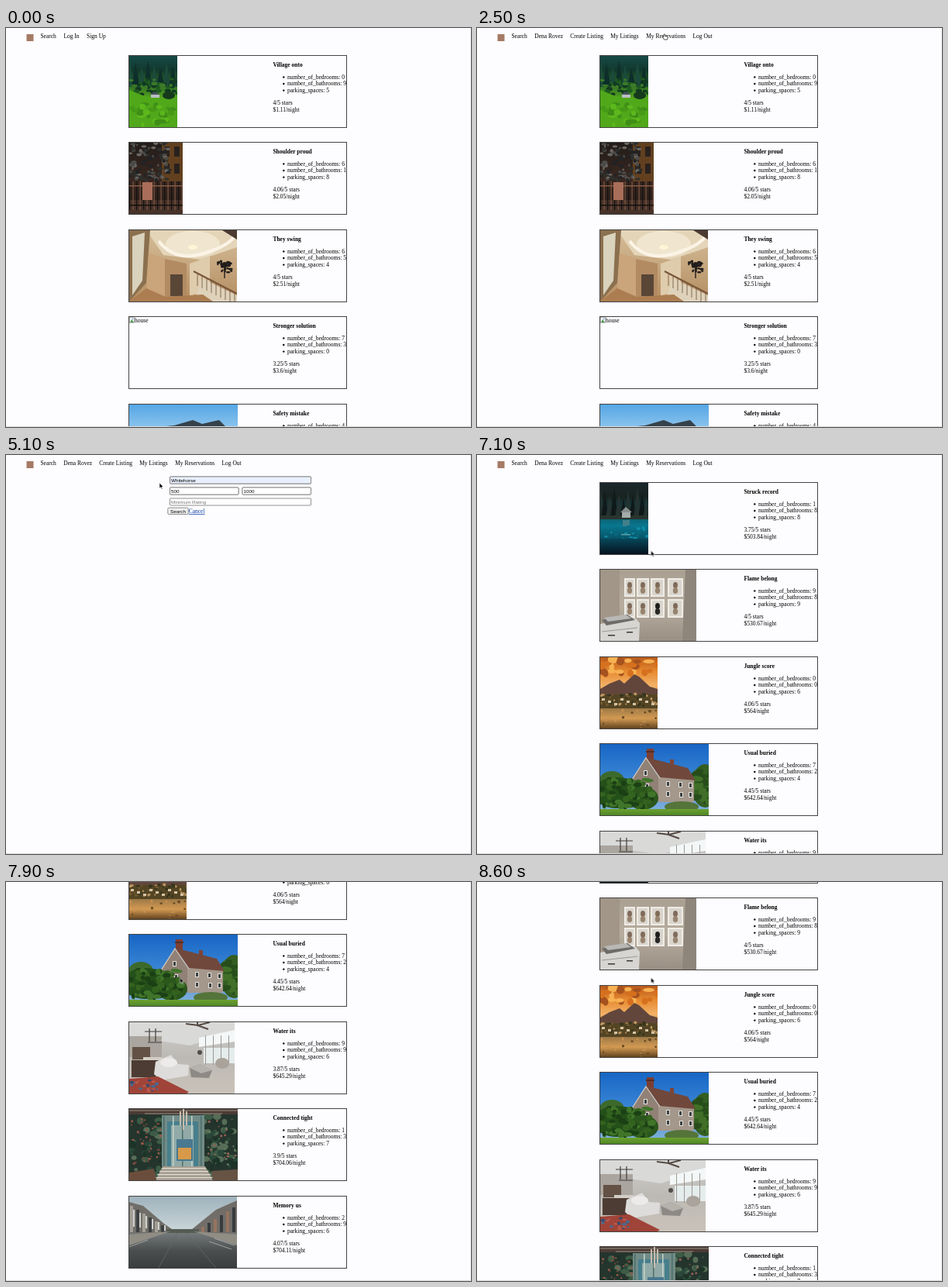
These frames come from a looping animation (600 by 515 pixels, 8700 ms). An HTML page:

```html
<!DOCTYPE html>
<html lang="en">
<head>
<meta charset="utf-8">
<title>House rentals</title>
<style>
  html, body { margin: 0; width: 100%; height: 100%; overflow: hidden; background: #fdfcfe; }
  svg { display: block; }
  text { font: 7.5px "Liberation Serif", "Times New Roman", serif; fill: #000; white-space: pre; }
  .title { font-weight: bold; }
  .ui { font: 6.25px "Liberation Sans", Arial, sans-serif; }
  .hint { fill: #757575; }
  .link { fill: #0b3fa8; text-decoration: underline; }
</style>
</head>
<body>
<script>
const LOOP = 8700, STEP = 100;

// Drawing helpers
let gradients = 0;
const rect = (x, y, w, h, fill, extra = '') =>
  `<rect x="${x}" y="${y}" width="${w}" height="${h}" fill="${fill}" ${extra}/>`;
const poly = (points, fill) => `<polygon points="${points}" fill="${fill}"/>`;
const oval = (x, y, rx, ry, fill) => `<ellipse cx="${x}" cy="${y}" rx="${rx}" ry="${ry}" fill="${fill}"/>`;
const line = (d, stroke, width = 1) => `<path d="${d}" fill="none" stroke="${stroke}" stroke-width="${width}"/>`;
const text = (x, y, words, cls = '') => `<text x="${x}" y="${y}" class="${cls}">${words}</text>`;
const group = (id, body) => `<g id="${id}">${body}</g>`;
const range = (n, draw) => Array.from({ length: n }, (_, i) => draw(i)).join('');

function fade(x, y, w, h, ...colors) {
  const id = 'fade' + gradients++;
  const stops = colors.map((c, i) => `<stop offset="${i / (colors.length - 1)}" stop-color="${c}"/>`).join('');
  return `<linearGradient id="${id}" x2="0" y2="1">${stops}</linearGradient>` + rect(x, y, w, h, `url(#${id})`);
}

function specks(n, x, y, w, h, r, ...colors) {
  let seed = n * 7 + w;
  const random = () => (seed = (seed * 16807) % 2147483647) / 2147483647;
  for (let i = 0; i < 5; i++) random();
  return range(n, i => oval((x + random() * w).toFixed(1), (y + random() * h).toFixed(1),
    (r * (0.5 + random())).toFixed(1), (r * (0.5 + random() * 0.6)).toFixed(1), colors[i % colors.length]));
}

// Pictures: [width, drawing], all 92 high
const photos = {
  meadow: [62, () => fade(0, 0, 62, 92, '#174a48', '#12382d', '#2c6a25', '#56a61d', '#48a016', '#2f7812')
    + range(9, i => poly(`${i * 8 - 5},40 ${i * 8},${4 + i * 5 % 13} ${i * 8 + 6},40`, i % 2 ? '#0d2e2a' : '#1c4a3a'))
    + specks(45, 0, 28, 62, 22, 3, '#1e5a20', '#123a20', '#3c7a28')
    + poly('0,44 20,52 62,57 62,92 0,92', '#50a81a')
    + specks(30, 0, 62, 62, 28, 4, '#5cb81c', '#469a16', '#3f8e18')
    + poly('27,50 33,46 40,50', '#46505a') + rect(28, 50, 11, 4, '#b9bfc0') + oval(51, 51, 8, 5, '#153a1c')],
  gate: [69, () => fade(0, 0, 69, 92, '#231c1a', '#38271f', '#241b18')
    + rect(42, 0, 27, 50, '#62401f') + range(4, i => rect(45 + i % 2 * 13, 5 + (i >> 1) * 22, 7, 13, '#29211e'))
    + specks(95, 0, 0, 52, 48, 2.5, '#202326', '#4b4b48', '#2c302f', '#6b6660')
    + rect(0, 74, 69, 18, '#463229')
    + range(16, i => rect(i * 4.5, 50, 1.2, 37, i % 2 ? '#7d5541' : '#16110f'))
    + rect(0, 55, 69, 1.5, '#865a45') + rect(0, 80, 69, 1.5, '#160f0d') + rect(17, 51, 13, 23, '#a96e59')],
  stairs: [139, () => fade(0, 0, 139, 92, '#d5bd99', '#c5a67e', '#b58c60')
    + poly('22,0 139,0 139,22 92,38 44,32', '#e4d5b9') + oval(82, 18, 35, 17, '#f0e5cf')
    + line('M38 14Q58 40 92 31T136 8', '#fbf4e6', 4)
    + poly('0,0 27,0 22,68 0,92', '#8b704f') + poly('4,8 20,3 17,65 4,84', '#d9d2bd')
    + poly('25,30 46,36 46,85 22,75', '#caa47a') + poly('46,37 74,43 74,86 46,86', '#b28b63')
    + rect(53, 57, 16, 28, '#594637') + poly('78,43 104,34 104,77 78,85', '#dfccac')
    + poly('93,62 139,84 139,92 84,92', '#dfd2bb') + range(9, i => line(`M${88 + i * 6} ${57 + i * 3}v15`, '#6b5039', .8))
    + line('M83 53L139 82', '#77563a', 2) + poly('22,75 46,86 95,83 108,92 0,92', '#ac7d50')
    + oval(82, 22, 6, 3, '#fff5d6') + line('M123 49v13', '#201b19', 1.4) + specks(26, 114, 39, 18, 16, 2, '#211d1c')
    + poly('120,0 139,0 139,12', '#4b3b31')],
  villa: [140, () => fade(0, 0, 140, 92, '#55a6e5', '#a8d4f2', '#dcebf3')
    + poly('27,30 58,27 82,20 94,25 116,20 127,31', '#35424b') + rect(30, 29, 94, 45, '#afaaa2')
    + rect(0, 70, 140, 22, '#6d8950')],
  lake: [62, () => fade(0, 0, 62, 92, '#1b272b', '#18231f', '#124a57', '#08778f', '#075064', '#061b29')
    + range(12, i => poly(`${i * 6 - 5},45 ${i * 6},${3 + i * 7 % 18} ${i * 6 + 5},45`, i % 2 ? '#10191a' : '#243331'))
    + rect(0, 42, 62, 5, '#29352e') + poly('26,38 33,31 41,38', '#88908e') + rect(28, 38, 11, 7, '#a3aca8')
    + rect(29, 48, 9, 8, '#417f8b') + specks(20, 0, 56, 62, 16, 2, '#0f8ba4', '#086b80')
    + rect(27, 66, 12, 1.5, '#5d9da5') + fade(0, 72, 62, 20, '#07475a', '#06131e')],
  nursery: [124, () => fade(0, 0, 124, 92, '#aaa092', '#b7ad9f', '#998f84')
    + rect(0, 0, 25, 80, '#a29688') + poly('110,0 124,0 124,92 106,92', '#8e857b')
    + [31, 47, 65, 87].map((x, i) => [11, 38].map((y, j) => rect(x, y, 14 + i * 2, 24, '#efece6')
      + rect(x + 2, y + 2, 10 + i * 2, 20, '#d9d5cd')
      + oval(x + 7 + i, y + 9, 3, 4, j && i === 2 ? '#1e1d1d' : '#806b5a')
      + oval(x + 7 + i, y + 16, 3.2, 4, j && i === 2 ? '#292827' : '#98846f')).join('')).join('')
    + poly('0,70 45,62 51,69 50,92 0,92', '#d6d5d2') + poly('2,65 35,58 45,65 8,72', '#6e6c69')
    + poly('5,62 33,58 40,63 10,67', '#b8b8b6') + line('M2 80L48 75', '#8d8b88', .8)
    + rect(10, 84, 9, 1.5, '#39393a') + rect(34, 80, 8, 1.5, '#39393a')],
  sunset: [74, () => fade(0, 0, 74, 92, '#b95a1d', '#e78a30', '#f2b268', '#b87a40', '#8b602f', '#68451e')
    + specks(24, 0, 2, 74, 20, 5, '#d6701e', '#f7b152', '#a5521f')
    + poly('0,48 0,41 12,34 25,29 31,34 44,22 50,25 64,38 74,41 74,58 0,58', '#62463c')
    + rect(0, 48, 74, 18, '#534524') + specks(45, 0, 47, 74, 17, 2, '#765a32', '#35351c', '#bd9660')
    + range(9, i => rect(2 + i * 8, 53 + i % 3 * 3, 4, 3, '#d6c4a5'))
    + fade(0, 66, 74, 26, '#9c7846', '#d39a52', '#62431f') + specks(20, 0, 68, 74, 22, 2, '#6a4b25', '#c79050')],
  cottage: [140, () => fade(0, 0, 140, 92, '#1766c4', '#3b86d6', '#8ab6dd')
    + oval(135, 54, 17, 28, '#345e22') + specks(35, 122, 34, 18, 42, 4, '#416f28', '#274d1b')
    + oval(15, 47, 16, 12, '#3c692c') + rect(60, 6, 9, 20, '#7d3e32') + rect(59, 9, 11, 2, '#522f2b')
    + rect(90, 20, 5, 12, '#804334')
    + poly('42,44 59,19 76,43 76,74 43,72', '#918176') + poly('75,42 121,45 121,75 75,75', '#a4978b')
    + poly('59,17 113,31 123,47 77,43', '#71483c') + line('M41 46L59 18L77 44', '#d3c9bc', 1.3)
    + [[56, 34], [58, 51], [85, 48], [101, 49], [114, 50], [85, 61], [102, 62], [114, 62]].map(([x, y]) =>
      rect(x, y, 5, 7, '#e4e3db') + rect(x + 1, y + 1, 3, 5, '#3b4042')).join('')
    + oval(22, 63, 32, 20, '#245019') + oval(55, 70, 20, 15, '#2b561c')
    + specks(65, 0, 45, 68, 38, 4, '#34621f', '#1b4015', '#40752a') + oval(105, 81, 22, 7, '#54743a')
    + fade(0, 84, 140, 8, '#6ca130', '#4f8726')],
  lounge: [136, () => fade(0, 0, 136, 92, '#cfcfcd', '#bcb9b4', '#c9c2b9')
    + poly('0,0 136,0 136,12 78,30 0,18', '#d9d9d8') + rect(0, 18, 42, 27, '#aaa59e')
    + poly('90,20 136,10 136,25 90,32', '#f4f7f7') + rect(96, 33, 40, 20, '#e5ecec')
    + range(4, i => rect(98 + i * 10, 17, 1, 38, '#9b9892'))
    + rect(4, 32, 23, 16, '#625144') + rect(3, 49, 35, 22, '#4d3c33') + rect(18, 45, 25, 4, '#d2cdc5')
    + line('M26 8v17M34 8v17M20 12h22M24 26h18', '#403c39', 1.2)
    + poly('34,51 54,42 63,54 77,55 76,69 41,75 32,67', '#dddcda') + oval(51, 52, 11, 6, '#ecebea')
    + poly('78,59 91,54 107,62 103,72 80,71', '#8d8985') + poly('78,59 91,54 107,62 93,66', '#b5b1ab')
    + oval(120, 53, 9, 7, '#a9a39b') + oval(91, 39, 3, 3, '#514d4a')
    + line('M73 2L89 4L104 0M88 4L102 9M88 0v5', '#544a43', 2)
    + poly('0,73 37,70 77,90 74,92 0,92', '#a04338') + specks(20, 3, 75, 34, 15, 2, '#496a91', '#bc594b', '#354b70')],
  porch: [140, () => rect(0, 0, 140, 92, '#24352d')
    + specks(150, 0, 5, 140, 84, 4, '#1c3327', '#3d5b46', '#29483a', '#566d57')
    + rect(42, 8, 55, 66, '#718b87') + rect(49, 16, 40, 59, '#477f8d') + rect(54, 21, 29, 54, '#91aaa7')
    + range(5, i => rect(44 + i * 12, 9, 1.5, 65, i % 2 ? '#c3d2cb' : '#4d6e69'))
    + rect(61, 39, 21, 28, '#497990') + rect(63, 50, 17, 15, '#d69a4a')
    + specks(38, 0, 12, 42, 60, 1.4, '#9a594b', '#78483d') + specks(30, 98, 12, 40, 60, 1.4, '#9b6259', '#647d62')
    + rect(0, 0, 140, 7, '#4b3b35') + line('M0 2H140M20 6H120', '#9d8f84', 1)
    + line('M70 0v27M66 3v18M74 3v18', '#c8bcae', 2)
    + poly('43,74 98,74 108,92 34,92', '#a69d91') + range(4, i => rect(42 - i * 3, 76 + i * 4, 57 + i * 6, 1.2, '#e1ddd4'))
    + poly('0,82 32,77 35,92 0,92', '#6b4d3c') + poly('106,80 140,78 140,92 108,92', '#675344')],
  street: [139, () => fade(0, 0, 139, 92, '#9fb2bc', '#ccd7da', '#e2e4df')
    + poly('0,7 18,12 45,35 55,42 55,49 0,58', '#716e69') + poly('139,5 112,17 91,34 80,43 80,49 139,58', '#716d68')
    + range(6, i => rect(1 + i * 8, 12 + i * 5, 4, 34 - i * 5, i % 2 ? '#3e4143' : '#a29d95')
      + rect(133 - i * 8, 14 + i * 5, 4, 32 - i * 5, i % 2 ? '#96745f' : '#373b3e')
      + rect(5 + i * 8, 17 + i * 4, 2, 22 - i * 3, '#d0d1ce'))
    + rect(48, 42, 42, 6, '#555b53') + fade(0, 47, 139, 45, '#74797a', '#4b4f50', '#393d3e')
    + poly('0,49 53,45 0,63', '#908d84') + poly('139,49 83,45 139,63', '#908d84')
    + line('M62 47L38 92M74 47L112 92', '#62686a', .8) + line('M110 54l26 9M103 58l29 10M24 56L0 65', '#b4b4ae', .8)],
};

const home = [
  ['Village onto', 0, 9, 5, '4', '1.11', 'meadow'],
  ['Shoulder proud', 6, 1, 8, '4.06', '2.05', 'gate'],
  ['They swing', 6, 5, 4, '4', '2.51', 'stairs'],
  ['Stronger solution', 7, 3, 0, '3.25', '3.6', null],
  ['Safety mistake', 4, 2, 3, '4.2', '3.75', 'villa'],
];
const found = [
  ['Struck record', 1, 8, 8, '3.75', '503.84', 'lake'],
  ['Flame belong', 9, 8, 9, '4', '530.67', 'nursery'],
  ['Jungle score', 0, 0, 6, '4.06', '564', 'sunset'],
  ['Usual buried', 7, 2, 4, '4.45', '642.64', 'cottage'],
  ['Water its', 9, 9, 6, '3.87', '645.29', 'lounge'],
  ['Connected tight', 1, 3, 7, '3.9', '704.06', 'porch'],
  ['Memory us', 2, 9, 6, '4.07', '704.11', 'street'],
];

function photo(name) {
  if (!name) {
    return rect(159.5, 1.5, 6, 7, '#fff', 'stroke="#999" stroke-width=".7"')
      + poly('160,8 162,4 165,8', '#4b9a52') + oval(163.5, 3.5, 1, 1, '#6f9fd8') + text(166, 7.7, 'house');
  }
  const [width, draw] = photos[name];
  return `<svg x="159" y="1" width="${width}" height="92">${draw()}</svg>`;
}

function card([title, beds, baths, parking, stars, price, picture], i) {
  const facts = [`number_of_bedrooms: ${beds}`, `number_of_bathrooms: ${baths}`, `parking_spaces: ${parking}`];
  return `<g transform="translate(0 ${Math.round(34.6 + 112.55 * i)})">`
    + photo(picture) + rect(158.5, .5, 281, 93, 'none', 'stroke="#444"')
    + text(344.4, 14.8, title, 'title')
    + facts.map((fact, k) => oval(358.3, 28.4 + k * 8.6, 1.2, 1.2, '#000') + text(363, 30.6 + k * 8.6, fact)).join('')
    + text(344.4, 64.2, `${stars}/5 stars`) + text(344.4, 72.6, `$${price}/night`) + '</g>';
}
const cards = list => list.map(card).join('');

const field = (x, y, w, words, typed, fill = '#fff') =>
  rect(x + .5, y + .5, w - 1, 9, fill, 'rx="1" stroke="#767676" stroke-width=".8"')
  + text(x + 2, y + 7.1, words, typed ? 'ui' : 'ui hint');
const button = (y, label) =>
  rect(208.8, y + .4, 26.4, 8.4, '#efefef', 'rx="1.5" stroke="#767676" stroke-width=".8"')
  + `<text x="222" y="${y + 6.8}" class="ui" text-anchor="middle">${label}</text>`;
const links = pairs => pairs.map(([x, label]) => text(x, 13, label)).join('');

const loginForm = field(211, 27.5, 183, 'Username') + field(211, 41.5, 183, 'Password') + button(54, 'Log In')
  + group('login-filled', field(211, 27.5, 183, 'guest', true, '#e8f0fe') + field(211, 41.5, 183, '••••••••', true, '#e8f0fe'));
const searchForm = field(211, 27.5, 183, 'City') + field(211, 41.5, 89.5, 'Minimum Price')
  + field(304.5, 41.5, 89.5, 'Maximum Price') + field(211, 55.5, 183, 'Minimum Rating')
  + button(67.7, 'Search') + text(235.7, 75, 'Cancel', 'link')
  + group('city', field(211, 27.5, 183, 'Whitehorse', true, '#e8f0fe'))
  + group('low', field(211, 41.5, 89.5, '500', true)) + group('high', field(304.5, 41.5, 89.5, '1000', true));

const arrow = '<path d="M0 0V7L1.7 5.6 2.8 8 4 7.5 2.9 5.1H5Z" fill="#000" stroke="#fff" stroke-width=".6"/>';
const hand = '<path d="M-1 -2.5Q0 -4 .8 -2.5V-.6L3.6 0Q4.6 .6 4 2.4L3.3 4H-.4L-2.8 .8Q-2.5 -.4 -1 .6Z" fill="#fff" stroke="#222" stroke-width=".8"/>';

document.body.innerHTML = `<svg width="600" height="515" viewBox="0 0 600 515">`
  + group('page', rect(26.5, 8, 9, 9, '#a57a66') + text(44.4, 13, 'Search')
    + group('guest-links', links([[74.4, 'Log In'], [104, 'Sign Up']]))
    + group('member-links', links([[74.3, 'Dena Rovez'], [120.2, 'Create Listing'], [172.2, 'My Listings'],
      [218.2, 'My Reservations'], [278.5, 'Log Out']]))
    + group('home', cards(home)) + group('login', loginForm)
    + group('reservations', cards(found.slice(3, 5)))
    + group('search', searchForm) + group('results', cards(found)))
  + rect(0, 514, 600, 1, '#d8d8d8') + rect(599, 0, 1, 515, '#e8e8ea')
  + group('cursor', group('arrow', arrow) + group('hand', hand)) + '</svg>';

// Motion: values advance on a 100 ms beat; a held track only switches
const rules = [];
function track(id, property, points, held) {
  const frames = points.map(([time, value], i) => {
    const next = points[i + 1];
    const steps = held || !next ? 1 : (next[0] - time) / STEP;
    const percent = Math.max(0, time - 5) / LOOP * 100;
    return `${percent.toFixed(4)}%{${property}:${value};animation-timing-function:steps(${steps})}`;
  });
  rules.push(`@keyframes ${id}{${frames.join('')}}#${id}{animation:${id} ${LOOP}ms infinite}`);
}
function show(id, ...spans) {
  const points = spans[0][0] ? [[0, 0]] : [];
  for (const [from, to] of spans) {
    points.push([from, 1]);
    if (to < LOOP) points.push([to, 0]);
  }
  track(id, 'opacity', points, true);
}
const move = (id, points) =>
  track(id, 'transform', points.map(([time, x, y]) => [time, `translate(${x}px,${y}px)`]));

show('guest-links', [0, 1900]);
show('member-links', [1900, LOOP]);
show('home', [0, 1000], [1900, 2800]);
show('login', [1000, 1900]);
show('login-filled', [1300, 1900]);
show('reservations', [2800, 4600]);
show('search', [4600, 6300]);
show('city', [4700, 6300]);
show('low', [4900, 6300]);
show('high', [5000, 6300]);
show('results', [6300, LOOP]);
show('arrow', [0, 800], [1000, 2400], [2800, 4400], [4600, 5500], [6000, LOOP]);
show('hand', [800, 1000], [2400, 2800], [4400, 4600], [5500, 6000]);

move('page', [[0, 0, 0], [7100, 0, 0], [7600, 0, -291], [7700, 0, -305], [8000, 0, -305],
  [8100, 0, -290], [8300, 0, -238], [8600, 0, -127]]);
move('cursor', [[0, 388, 522], [100, 388, 505], [800, 84, 11], [1000, 84, 11], [1500, 222, 58], [1800, 222, 58],
  [2300, 238, 14], [2500, 242, 11], [2800, 242, 11], [3600, 377, 198], [3800, 377, 198], [4400, 57, 10],
  [4700, 57, 10], [5100, 198, 36], [5300, 252, 41], [5400, 252, 41], [5500, 58, 10], [5900, 58, 10],
  [6200, 222, 71], [6400, 222, 71], [6700, 224.5, 123.5], [8600, 224.5, 123.5]]);

document.head.appendChild(document.createElement('style')).textContent = rules.join('\n');
</script>
</body>
</html>
```
